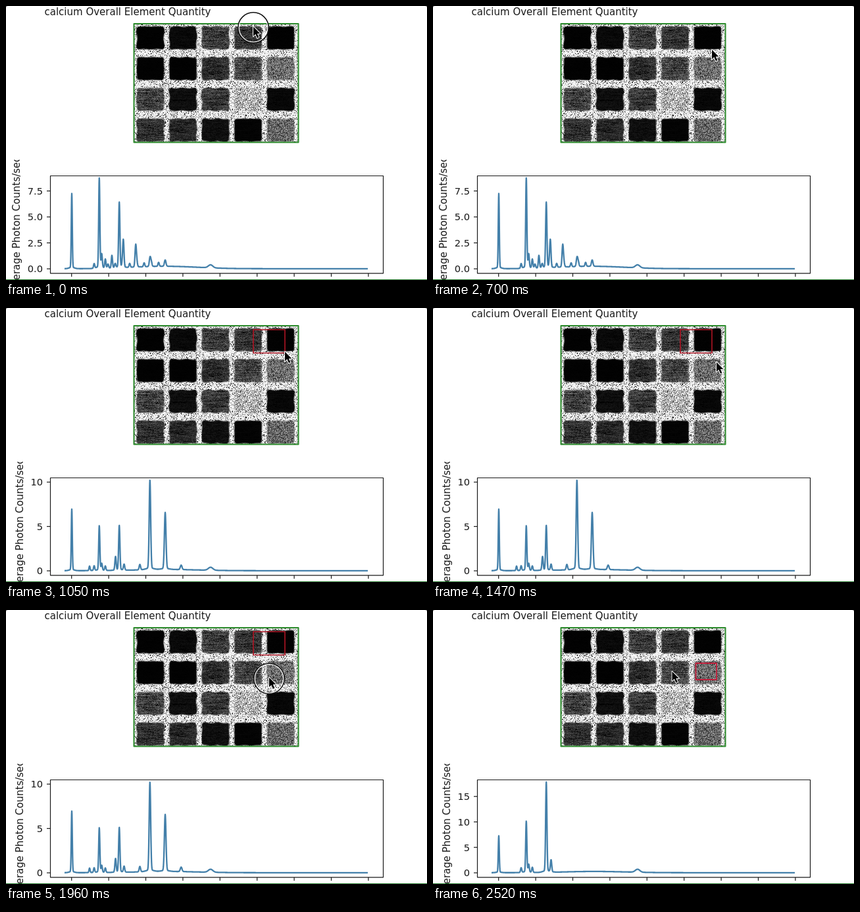
An HTML page with a canvas for the animation above (2590 ms loop, 640 by 417 pixels).

```html
<!DOCTYPE html>
<html lang="en">
<head>
<meta charset="utf-8">
<title>Element map</title>
<style>
html, body { margin: 0; width: 100%; height: 100%; overflow: hidden; background: #fff; }
canvas { display: block; }
</style>
</head>
<body>
<canvas id="stage" width="640" height="417"></canvas>
<script>
const ctx = document.getElementById('stage').getContext('2d');
const LOOP = 2590, STEP = 70;
const MAP = { x: 194, y: 26, w: 251, h: 182 };
const INK = '#1a1a1a';

// Main lines of each spectrum: position in px -> counts
const spectra = [
  { step: 2.5, unit: 15.8, hump: 3.6, ripple: 6, lines: { 100: 7.1, 141.8: 8.55, 161: 1.2, 172.2: 6.2, 178.4: 2.5, 197.2: 2.1, 219: .9, 242: .6 } },
  { step: 5, unit: 13.5, hump: 1.8, ripple: 0, lines: { 100: 6.8, 127: .5, 141.8: 4.95, 166.5: 1.5, 172.2: 4.95, 179.5: .65, 203.5: .6, 218.8: 9.9, 242: 6.3, 266.3: .5 } },
  { step: 5, unit: 7.75, hump: 1.9, ripple: 0, lines: { 100: 7.1, 141.8: 9.9, 172.2: 17.4, 179.5: 2.3 } }
];

// Pointer stops: [time, x, y]
const path = [[0, 376, 31.5], [330, 424, 66.5], [1190, 424, 66.5], [1400, 431, 82.5],
  [1540, 431, 82.5], [2010, 399, 103.5], [2240, 399, 103.5], [2520, 363.5, 93.5], [LOOP, 363.5, 93.5]];

const clamp = v => Math.max(0, Math.min(1, v));
const smooth = u => u * u * (3 - 2 * u);
const bell = (d, width) => Math.exp(-((d / width) ** 2) / 2);

function makeMap() {
  const shades = [[2, 10, 62, 55, 2], [2, 2, 48, 72, 108], [68, 14, 60, 182, 8], [48, 40, 15, 4, 100]];
  let seed = 7, streak = 0;
  const rand = () => (seed = seed * 16807 % 2147483647) / 2147483647;
  const layer = document.createElement('canvas');
  layer.width = MAP.w;
  layer.height = MAP.h;
  const c = layer.getContext('2d');
  const img = c.createImageData(MAP.w, MAP.h);
  for (let y = 0; y < MAP.h; y++) {
    for (let x = 0; x < MAP.w; x++) {
      const row = Math.min(3, Math.floor(y / 46.5)), col = Math.min(4, Math.floor(x / 49.8));
      const dx = x - 25 - 49.5 * col, dy = y - 22 - 46.8 * row;
      const dist = Math.hypot(Math.max(Math.abs(dx) - 16.8, 0), Math.max(Math.abs(dy) - 13.4, 0)) - 4
        + .8 * Math.sin(x * .31 + row * 2) * Math.cos(y * .27 + col);
      const shade = shades[row][col];
      const grain = (rand() - .5) * shade;
      streak = streak * .88 + (rand() - .5) * .6;
      const dark = shade > 95 ? shade + grain * 1.3
        : shade * (1.1 - .3 * bell(Math.hypot(dx, dy), 11) + streak * .75) + grain;
      const light = 246 - 300 * rand() ** 6.5;
      const v = dark + (light - dark) * clamp((dist + 1.2) / 2.4);
      img.data.set([v, v, v, 255], (y * MAP.w + x) * 4);
    }
  }
  c.putImageData(img, 0, 0);
  c.filter = 'blur(0.6px)';
  c.drawImage(layer, 0, 0);
  return layer;
}
const map = makeMap();

function line(x1, y1, x2, y2) {
  ctx.beginPath();
  ctx.moveTo(x1, y1);
  ctx.lineTo(x2, y2);
  ctx.stroke();
}

function box(x, y, w, h, color, width) {
  ctx.strokeStyle = color;
  ctx.lineWidth = width;
  ctx.strokeRect(x, y, w, h);
}

function text(string, x, y, align, size = 15) {
  ctx.font = `${size}px "DejaVu Sans", sans-serif`;
  ctx.fillStyle = INK;
  ctx.textAlign = align;
  ctx.fillText(string, x, y);
}

function makeCurve({ unit, hump, ripple, lines }) {
  const peaks = Object.entries(lines).map(([x, counts]) => [+x, counts * unit, .75 * Math.exp((x - 100) / 300)]);
  const main = lines[141.8] * unit;
  peaks.push([134, 7, .9], [145.5, main * .15, .9], [151, main * .1, .9], [311, 4.5, 3.4]);
  for (let x = 155; x < 235; x += 11) peaks.push([x, ripple, 1]);
  const curve = new Path2D();
  for (let x = 89; x <= 550; x += .25) {
    let h = x > 105 ? hump * bell(x - 245, 46) : 0;
    for (const [px, height, width] of peaks) {
      h += height * (bell(x - px, width) + .02 * bell(x - px, width * 5));
    }
    curve.lineTo(x, 399.8 - h);
  }
  return curve;
}
const curves = spectra.map(makeCurve);

function drawChart(stage) {
  const { step, unit } = spectra[stage];
  const digits = step % 1 ? 1 : 0;
  box(67.5, 258.5, 506, 148.3, INK, 1.2);
  for (let v = 0; v * unit < 140; v += step) {
    const y = 400 - v * unit;
    line(62, y, 67, y);
    text(v.toFixed(digits), 56, y + 5.3, 'right', 14.6);
  }
  for (let x = 99.7; x < 560; x += 56.4) line(x, 407, x, 412);

  ctx.save();
  ctx.beginPath();
  ctx.rect(0, 234, 60, 182);
  ctx.clip();
  ctx.translate(digits ? 21 : 26, 332.5);
  ctx.rotate(-Math.PI / 2);
  text('Average Photon Counts/sec', 0, 0, 'center');
  ctx.restore();

  ctx.strokeStyle = '#4480aa';
  ctx.lineWidth = 2.3;
  ctx.lineJoin = 'round';
  ctx.stroke(curves[stage]);
}

function ring(x, y, r, color, width) {
  ctx.beginPath();
  ctx.arc(x, y, r, 0, 7);
  ctx.strokeStyle = color;
  ctx.lineWidth = width;
  ctx.stroke();
}

const arrow = new Path2D('M0 0V16L3.7 12.6L6.6 19.2L9.3 18L6.5 11.6H11.5Z');

function drawPointer(x, y, pressed) {
  if (pressed) {
    ring(x, y + 1.5, 22, '#fff', 1.6);
    ring(x, y + 1.5, 23.2, '#111', 1.5);
  }
  ctx.save();
  ctx.translate(x, y);
  ctx.scale(.9, .9);
  ctx.strokeStyle = '#fff';
  ctx.lineWidth = 2.2;
  ctx.stroke(arrow);
  ctx.fillStyle = '#000';
  ctx.fill(arrow);
  ctx.restore();
}

function draw(t) {
  ctx.fillStyle = '#666';
  ctx.fillRect(0, 0, 640, 417);
  ctx.fillStyle = '#fff';
  ctx.beginPath();
  ctx.roundRect(0, 0, 640, 430, 3);
  ctx.fill();
  ctx.fillStyle = '#237a2b';
  ctx.fillRect(0, 416, 640, 1);

  text('calcium Overall Element Quantity', 58.5, 14, 'left');
  ctx.drawImage(map, MAP.x, MAP.y);
  box(194.5, 27, 250, 180.5, '#2b8a2b', 2);

  const stage = t < 840 ? 0 : t < 2100 ? 1 : 2;
  drawChart(stage);
  if (stage === 1) box(376, 33, 48, 35.5, '#b01424', 1.6);
  if (stage === 2) box(399.5, 81, 31.5, 25, '#c01f3c', 1.8);

  const i = path.findIndex(p => p[0] > t);
  const [t0, x0, y0] = path[i - 1], [t1, x1, y1] = path[i];
  const u = smooth((t - t0) / (t1 - t0));
  const pressed = t < 490 || (t >= 1540 && t < 2030);
  drawPointer(x0 + (x1 - x0) * u, y0 + (y1 - y0) * u, pressed);
}

const start = performance.now();
function tick() {
  const t = (performance.now() - start) % LOOP;
  draw(Math.floor(t / STEP) * STEP);
  requestAnimationFrame(tick);
}
tick();
</script>
</body>
</html>
```
